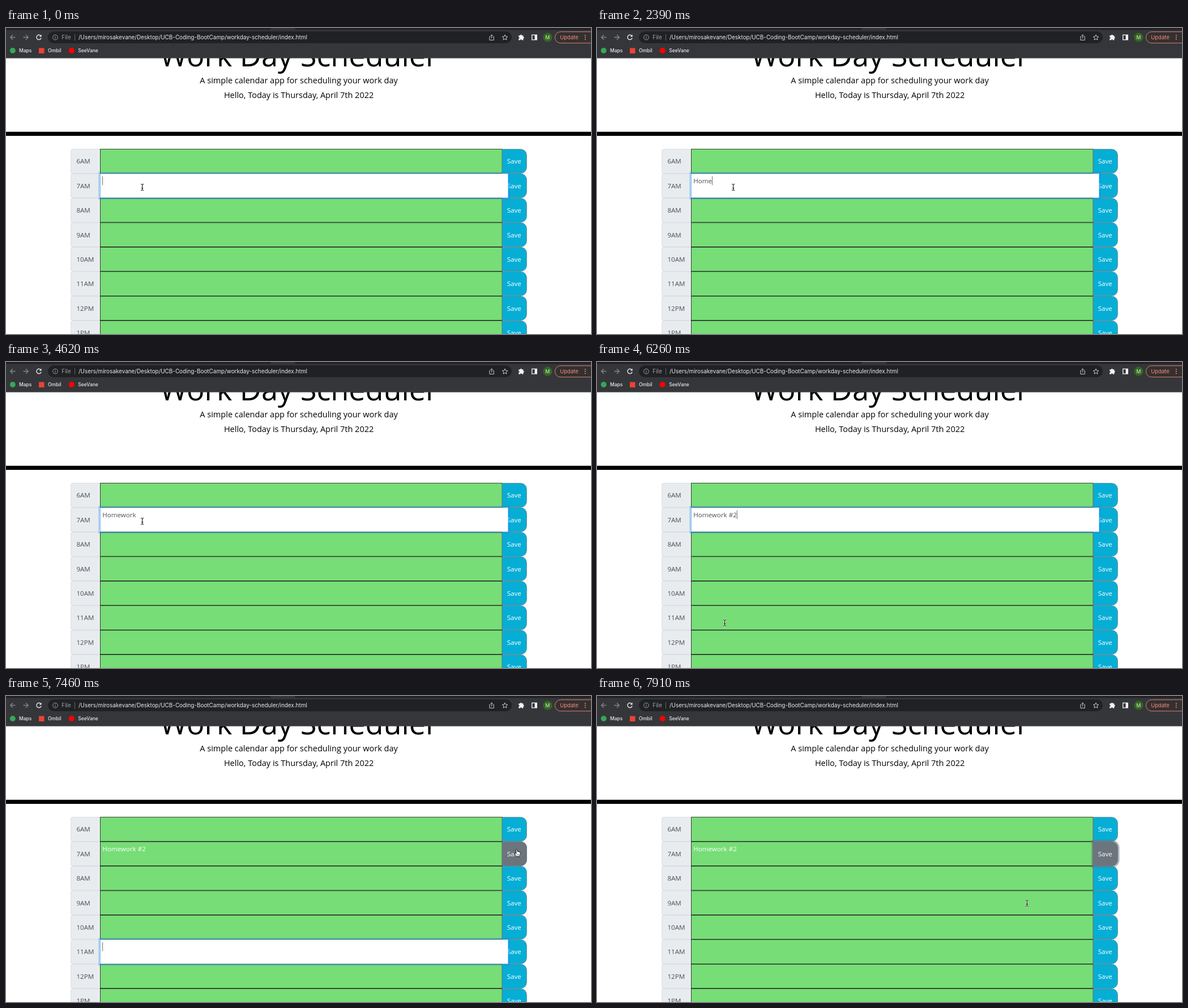
Animation, 1033 px wide and 542 px high, one loop 8 s. Source, as an HTML page:

```html
<!DOCTYPE html>
<html lang="en">
<head>
<meta charset="utf-8">
<title>Work Day Scheduler</title>
<style>
  html, body { margin: 0; width: 100%; height: 100%; overflow: hidden; background: #fff; }
  svg { display: block; width: 1033px; height: 542px; }
  text { white-space: pre; }
  .page { font-family: "Open Sans", sans-serif; font-size: 11.6px; }
  .lead { font-size: 14.5px; }
  .ui { font-family: Inter, Roboto, sans-serif; font-size: 9.92px; fill: #e8eaed; }
  .mark { font-size: 8.5px; font-weight: 500; }
</style>
</head>
<body>
<svg viewBox="0 0 1033 542">
  <rect width="1033" height="542" fill="#fff"/>
  <g class="page">
    <g text-anchor="middle">
      <text x="517.1" y="68.3" font-size="52.2">Work Day Scheduler</text>
      <text class="lead" x="517.1" y="98.1">A simple calendar app for scheduling your work day</text>
      <text class="lead" x="517.1" y="124.2">Hello, Today is Thursday, April 7th 2022</text>
    </g>
    <rect y="183.8" width="1033" height="7.25"/>
    <g id="rows"></g>
    <g id="live"></g>
  </g>

  <g id="browser">
    <rect width="1033" height="53.4" fill="#35363a"/>
    <rect width="1033" height="3.2" fill="#202124"/>
    <path d="M464 3.2q4 0 4-3.2h42q0 3.2 4 3.2z" fill="#35363a"/>
    <rect y="52.6" width="1033" height="0.8" fill="#4a4b4f"/>
    <rect x="74" y="6" width="819" height="21" rx="10.5" fill="#202124"/>

    <g fill="none" stroke-width="1.3" stroke="#85868a">
      <path d="M16.5 16.5H8M12 12.2L7.7 16.5L12 20.8"/>
      <path d="M30.5 16.5H39M35 12.2L39.3 16.5L35 20.8"/>
      <path d="M61.3 13.6A4.2 4.2 0 1 0 62.2 17.6" stroke="#e8eaed" stroke-width="1.4"/>
      <path d="M62.6 11.6V15.6H58.6Z" fill="#e8eaed" stroke="none"/>
      <g stroke="#9aa0a6" stroke-width="1">
        <circle cx="87" cy="16.6" r="4.4"/>
        <path d="M87 16V19M87 14V15"/>
        <path d="M121.5 11V22.5" stroke="#5f6368"/>
      </g>
      <g stroke="#c8cacd" stroke-width="1">
        <path d="M855.5 15.2H853.9V21.4H861.3V15.2H859.7M857.6 18.5V12M855.6 13.8L857.6 11.8L859.6 13.8"/>
        <path d="M881 11.9L882.4 15.1L885.8 15.4L883.2 17.7L884 21.1L881 19.3L878 21.1L878.8 17.7L876.2 15.4L879.6 15.1Z"/>
      </g>
    </g>
    <path fill="#f1f3f4" d="M905.2 13.2H908a1.4 1.4 0 0 1 2.8 0H913.4V15.8a1.4 1.4 0 0 1 0 2.8V21.6H910.8a1.4 1.4 0 0 0-2.8 0H905.2V18.8a1.4 1.4 0 0 0 0-2.8Z"/>
    <rect x="928.7" y="12.3" width="8.6" height="8.6" fill="none" stroke="#f1f3f4" stroke-width="1.3"/>
    <rect x="933.6" y="12" width="4" height="9" fill="#f1f3f4"/>
    <circle cx="956.4" cy="16.6" r="8" fill="#33691e"/>
    <rect x="969.4" y="6.7" width="76" height="20" rx="10" fill="#35302f" stroke="#d9827b" stroke-width="1"/>
    <g fill="#f28b82">
      <circle cx="1022.8" cy="13" r="1"/><circle cx="1022.8" cy="16.6" r="1"/><circle cx="1022.8" cy="20.2" r="1"/>
    </g>

    <circle cx="11.8" cy="40" r="5" fill="#34a853"/>
    <rect x="58" y="35.5" width="9.5" height="9.5" fill="#ea4335"/>
    <circle cx="115.7" cy="40" r="5" fill="#f00"/>

    <g class="ui">
      <text x="98.3" y="20.1" fill="#9aa0a6">File</text>
      <text x="128" y="20.1">/Users/mirosakevane/Desktop/UCB-Coding-BootCamp/workday-scheduler/index.html</text>
      <text x="956.4" y="19.8" text-anchor="middle" font-size="8.6">M</text>
      <text x="978.2" y="20.1" font-size="9.5" fill="#f28b82">Update</text>
      <text class="mark" x="23" y="43.1">Maps</text>
      <text class="mark" x="74" y="43.1">Ombil</text>
      <text class="mark" x="127.3" y="43.1">SeeVane</text>
    </g>
  </g>
  <g id="cursor"></g>
</svg>

<script>
const LOOP = 8000;
const TOP = 214.3, PITCH = 43.4, LINE = 0.725;
const LEFT = 114.7, FIELD = 166, BUTTON = 875.8, RIGHT = 919.4;
const GREEN = '#77dd77', BLUE = '#06aed5', GREY = '#6c757d', INK = '#495057';
const HOURS = ['6AM', '7AM', '8AM', '9AM', '10AM', '11AM', '12PM', '1PM'];

// [start, text typed so far]
const TYPING = [
  [0, ''], [1790, 'H'], [1940, 'Ho'], [2090, 'Hom'], [2390, 'Home'],
  [2680, 'Homew'], [2830, 'Homewo'], [3130, 'Homewor'], [3280, 'Homework'],
  [4030, 'Homework '], [5070, 'Homework #'], [5220, 'Homework #2']
];
// [start, shape, x, y]
const POINTER = [
  [0, 'beam', 240.7, 282], [5520, 'beam', 229, 312], [5670, 'beam', 180, 395],
  [5820, 'beam', 140, 458], [5970, 'beam', 131.5, 476], [6110, 'beam', 176, 473],
  [6260, 'beam', 225.6, 462], [6710, 'beam', 300, 436], [6860, 'beam', 530, 352],
  [7010, 'beam', 810, 292], [7160, 'arrow', 1014, 268], [7310, 'arrow', 940, 275],
  [7460, 'hand', 902, 271.5], [7760, 'beam', 850, 306], [7910, 'beam', 759.4, 367]
];
const CARET_OFF = [[450, 890], [1340, 1790], [3730, 4030], [4620, 5070], [5820, 6260], [7010, 7460]];
const FOCUS_NEXT = 6410, HOVER = 7460, SAVE = 7610, SETTLED = 7760;

const SHAPES = {
  beam: ['#fff', '#000'].map((c, i) =>
    `<path d="M-2.5-5.6Q0-5.6 0-4Q0-5.6 2.5-5.6M0-4V4.2M-2.5 5.8Q0 5.8 0 4.2Q0 5.8 2.5 5.8M-1.6 1.8H1.6"
      fill="none" stroke="${c}" stroke-width="${i ? 1 : 2.2}"/>`).join(''),
  arrow: '<path d="M0 0V11.6L2.7 9.1L4.5 13L6.3 12.2L4.6 8.4H8.2Z" fill="#000" stroke="#fff" stroke-width=".8"/>',
  hand: `<path d="M-1.8 .8Q-.8-.6 .2 .8L1.4 4.4Q2.4 3.6 3.2 4.6Q4.2 3.9 4.9 5Q6.3 4.7 6.4 6.4
      Q6.7 9.6 5.4 11V13H-1V11.6Q-2.8 9.8-4.2 7.4Q-4 6-2.6 6.6L-.9 8Z" fill="#fff" stroke="#000" stroke-width=".9"/>
    <path d="M1.1 9V11.2M2.8 9V11.2M4.3 9V11.2" stroke="#000" stroke-width=".6"/>`
};

const $ = id => document.getElementById(id);
const pen = document.createElement('canvas').getContext('2d');
pen.font = '11.6px "Open Sans", sans-serif';

const rowTop = i => TOP + i * PITCH;
const last = (list, t) => list.filter(k => k[0] <= t).pop();
const label = (x, y, s, fill, anchor = 'start') =>
  `<text x="${x}" y="${y}" fill="${fill}" text-anchor="${anchor}">${s}</text>`;
const box = (x, y, w, h, fill, stroke, width = LINE) =>
  `<rect x="${x}" y="${y}" width="${w}" height="${h}" fill="${fill}" stroke="${stroke}" stroke-width="${width}"/>`;

function hourCell(i) {
  const y = rowTop(i) + LINE / 2, h = PITCH - LINE, r = 2.9;
  return `<path d="M${FIELD} ${y}H${LEFT + r}q${-r} 0 ${-r} ${r}v${h - 2 * r}q0 ${r} ${r} ${r}H${FIELD}"
    fill="#e9ecef" stroke="#ced4da" stroke-width="${LINE}"/>` +
    label(124.4, rowTop(i) + 26.1, HOURS[i], INK);
}

function field(i, stroke = '#000') {
  return box(FIELD + LINE / 2, rowTop(i) + LINE / 2, BUTTON - FIELD, PITCH - LINE, GREEN, stroke);
}

function button(i, fill = BLUE, ring = false) {
  const y = rowTop(i) + LINE / 2, h = PITCH - LINE, r = 10.5;
  const d = `M${BUTTON + LINE / 2} ${y}H${RIGHT - r}a${r} ${r} 0 0 1 ${r} ${r}v${h - 2 * r}a${r} ${r} 0 0 1 ${-r} ${r}H${BUTTON + LINE / 2}Z`;
  const glow = ring ? `<path d="${d}" fill="none" stroke="${GREY}" stroke-opacity=".5" stroke-width="6.4"/>` : '';
  return glow + `<path d="${d}" fill="${fill}" stroke="${GREY}" stroke-width="${LINE}"/>` +
    label(897.2, rowTop(i) + 26.1, 'Save', '#fff', 'middle');
}

function entry(i, s, fill) {
  return label(170.2, rowTop(i) + 17.4, s, fill);
}

function focused(i, s, caret) {
  const y = rowTop(i), w = 887 - FIELD, ring = 2.9;
  const x = 170.3 + pen.measureText(s).width;
  return box(FIELD - ring / 2, y - ring / 2, w + ring, PITCH + ring, 'none', 'rgba(0,123,255,.25)', ring) +
    box(FIELD + LINE / 2, y + LINE / 2, w - LINE, PITCH - LINE, '#fff', '#80bdff') +
    entry(i, s, INK) +
    (caret ? `<rect x="${x}" y="${y + 5}" width=".8" height="15.6" fill="${INK}"/>` : '');
}

function liveRows(t) {
  const caret = !CARET_OFF.some(([a, b]) => t >= a && t < b);
  const text = last(TYPING, t)[1];
  if (t < FOCUS_NEXT) return focused(1, text, caret);
  let out = entry(1, text, '#fff');
  if (t < SAVE) out += focused(5, '', caret);
  else if (t < SETTLED) out += field(5, '#407090') + button(5);
  if (t >= HOVER) out += button(1, GREY, t >= SAVE);
  return out;
}

let shown = '';
function draw(t) {
  const rows = liveRows(t);
  if (rows !== shown) $('live').innerHTML = shown = rows;
  const [, shape, x, y] = last(POINTER, t);
  const cursor = $('cursor');
  if (cursor.dataset.shape !== shape) {
    cursor.innerHTML = SHAPES[shape];
    cursor.dataset.shape = shape;
  }
  cursor.setAttribute('transform', `translate(${x} ${y})`);
}

$('rows').innerHTML = HOURS.map((_, i) => hourCell(i) + field(i) + button(i)).join('');

const start = performance.now();
function tick() {
  draw((performance.now() - start) % LOOP);
  requestAnimationFrame(tick);
}
tick();
</script>
</body>
</html>
```
